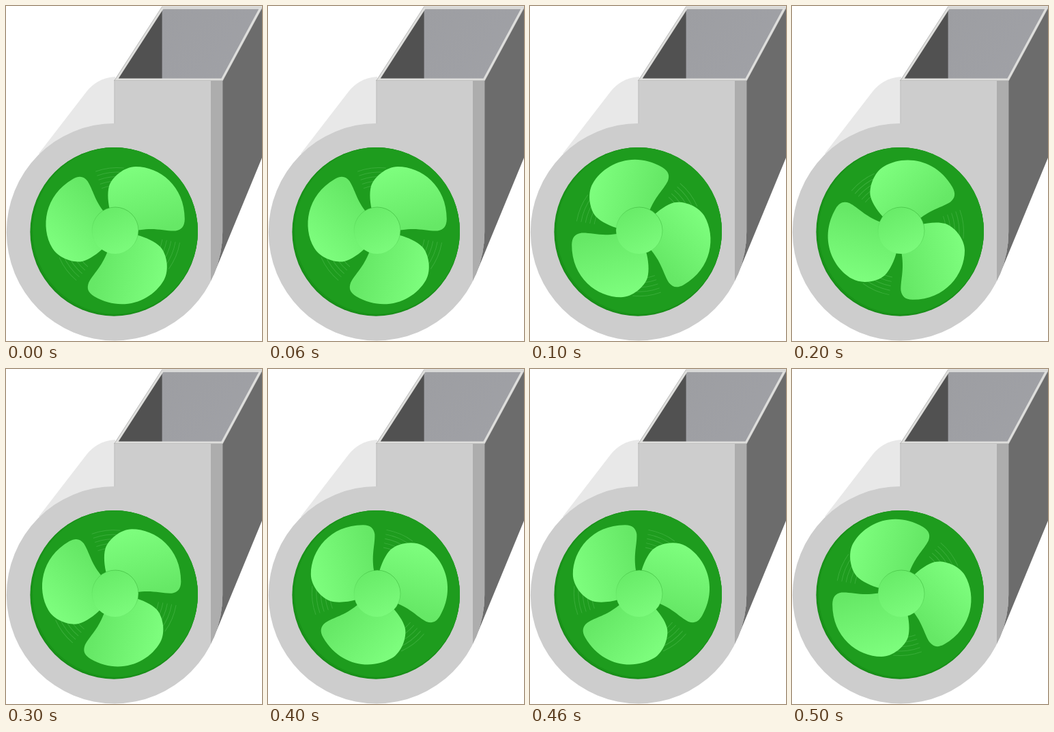
Write an HTML page with a canvas that moves like this. It is 375 px wide and 488 px high and loops after 600 ms.

```html
<!DOCTYPE html>
<html lang="en">
<head>
<meta charset="utf-8">
<title>Blower</title>
<style>
  html, body { margin: 0; width: 100%; height: 100%; overflow: hidden; background: #fff; }
  canvas { display: block; width: 375px; height: 488px; }
</style>
</head>
<body>
<canvas id="stage"></canvas>
<script>
const W = 375, H = 488, STEP = 100;
const ANGLES = [0, 60, 90, 120, 150, 180];
const HUB = { x: 160, y: 327, r: 34 };
const PIVOT = { x: 160.5, y: 326.5 };
const WOBBLE = { x: 2.5, y: 2 };
const RAD = Math.PI / 180;

const canvas = document.getElementById('stage');
const ctx = canvas.getContext('2d');
const dpr = window.devicePixelRatio || 1;
canvas.width = W * dpr;
canvas.height = H * dpr;

const disc = (x, y, r) => {
  const p = new Path2D();
  p.arc(x, y, r, 0, Math.PI * 2);
  return p;
};

const fill = (shape, color) => {
  ctx.fillStyle = color;
  ctx.fill(typeof shape === 'string' ? new Path2D(shape) : shape);
};

const stroke = (shape, color, width) => {
  ctx.strokeStyle = color;
  ctx.lineWidth = width;
  ctx.stroke(typeof shape === 'string' ? new Path2D(shape) : shape);
};

const linear = (x0, y0, x1, y1, from, to) => {
  const g = ctx.createLinearGradient(x0, y0, x1, y1);
  g.addColorStop(0, from);
  g.addColorStop(1, to);
  return g;
};

// Blade outline relative to the centre of the three blades
const blade = new Path2D(
  'M-10 -28 C-13.5 -40 -15 -56 -12 -66 C-8 -79 10 -94.5 27 -94.5' +
  ' C62 -94.5 99 -66 98.8 -18 C98.5 -7 94 -2.5 85.5 -1' +
  ' C70 -.3 57 -6 33 -2.3 L0 0Z');

const front = new Path2D(
  'M158.7 108 H317.2 V329 A158.2 158.2 0 1 1 158.7 171Z');

function drawHousing() {
  fill('M160 103 C141 104 127 113 117 126 L48 215 L159 329Z', '#e8e8e8');
  fill('M317 107 L375 3 V221 L304 392 L290 329Z', '#6c6c6c');
  fill(front, '#cdcdcd');

  ctx.save();
  ctx.clip(front);
  fill('M300 108 H318 V403 H300Z', '#adadad');
  ctx.restore();
  stroke('M159 108 V171', '#bdbdbd', 1);

  const rim = 'M162 107 L229.5 2.8 H373 L316.5 107Z';
  stroke(rim, '#a4a4a4', 4.2);
  fill(rim, linear(229, 0, 350, 106, '#9d9ea2', '#a0a1a6'));
  fill('M162 107 L228.6 3 V107Z', '#515151');
  stroke(rim, '#dededc', 3.2);
}

function drawArcs() {
  for (let r = 67; r <= 93; r += 6.5) {
    const p = new Path2D();
    p.arc(0, 0, r, -110 * RAD, -84 * RAD);
    stroke(p, 'rgba(76, 184, 76, .65)', 0.9);
  }
}

function drawFan(angle) {
  fill(disc(158.2, 328.9, 122.8), '#168816');
  fill(disc(158.6, 328.3, 122.3), '#199319');
  fill(disc(160, 327.5, 121), '#1e9c1e');

  ctx.save();
  ctx.translate(PIVOT.x, PIVOT.y);
  ctx.rotate(angle * RAD);
  ctx.translate(WOBBLE.x, WOBBLE.y);
  const shade = linear(25, -95, 50, 0, '#7efe7e', '#66e866');
  for (let i = 0; i < 3; i++) {
    drawArcs();
    ctx.rotate(120 * RAD);
  }
  for (let i = 0; i < 3; i++) {
    fill(blade, shade);
    ctx.rotate(120 * RAD);
  }
  ctx.restore();

  const hub = disc(HUB.x, HUB.y, HUB.r);
  fill(hub, linear(145, 294, 175, 360, '#68eb68', '#7cfb7c'));
  stroke(hub, linear(180, 300, 150, 355, 'rgba(54, 176, 54, .7)', 'rgba(54, 176, 54, 0)'), 0.8);
}

function draw(time) {
  const i = Math.floor(time / STEP) % ANGLES.length;
  ctx.setTransform(dpr, 0, 0, dpr, 0, 0);
  fill('M0 0 H375 V488 H0Z', '#fff');
  drawHousing();
  drawFan(ANGLES[i]);
}

let start;
function tick(now) {
  if (start === undefined) start = now;
  draw(Math.max(0, now - start));
  requestAnimationFrame(tick);
}
draw(0);
requestAnimationFrame(tick);
</script>
</body>
</html>
```
